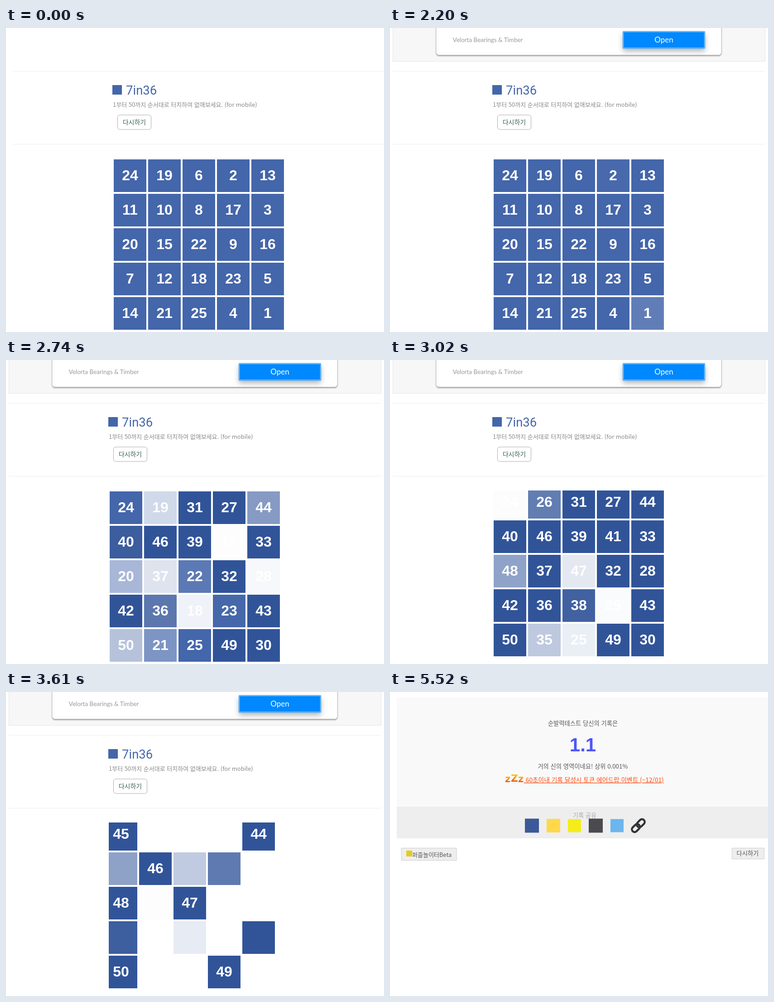
An HTML page that plays this animation: 835x671 px, repeating every 6.28 s.

```html
<!DOCTYPE html>
<html lang="ko">
<head>
<meta charset="utf-8">
<style>
  html, body { margin: 0; width: 100%; height: 100%; overflow: hidden; background: #fff; }
  svg { display: block; width: 100%; height: 100%; font: 300 13.3px "Noto Sans CJK KR", "Noto Sans CJK", sans-serif; }
  .mid { text-anchor: middle; }
  .end { text-anchor: end; }
  .rule { stroke: #eee; }
  .card { fill: #fff; stroke: #ccc; filter: drop-shadow(0 2px 1px rgba(0,0,0,.35)); }
  .open { fill: #08f; filter: drop-shadow(0 6px 6px rgba(0,0,0,.28)); }
  .early { font-family: "Noto Sans", sans-serif; font-weight: 400; }
  .late { font-family: Lato, sans-serif; font-weight: 400; }
  .number { font: bold 32px "Liberation Sans", Arial, sans-serif; fill: #fff; text-anchor: middle; }
  .blurred { filter: blur(10px); }
  .trial { font-family: "Open Sans", sans-serif; font-weight: 400; }
  .heading { font-size: 52px; fill: #333; stroke: #333; stroke-width: 1.2; }
  .plain { fill: #eee; stroke: #ccc; }
  .link { font-size: 13.7px; font-weight: 400; fill: #ff4a10; text-decoration: underline; }
  .chain { fill: none; stroke: #333; stroke-width: 4.5; }
</style>
</head>
<body>
<svg viewBox="0 0 835 671">
  <defs>
    <linearGradient id="sleepy" x2="0" y2="1">
      <stop offset=".25" stop-color="#f5c21c"/><stop offset=".85" stop-color="#ee4a12"/>
    </linearGradient>
  </defs>

  <g id="page">
    <rect x="-60" y="-60" width="970" height="800" fill="#fff"/>
    <g id="ad">
      <rect x="15.5" y="-60" width="822" height="133.5" fill="#f7f7f7" stroke="#e4e4e4"/>
      <rect class="card" x="111" y="-40" width="630" height="99.5" rx="6"/>
      <rect class="open" x="523" y="7" width="182" height="38.5" rx="3"/>
      <rect x="524.5" y="8.5" width="179" height="35.5" rx="2" fill="none" stroke="#fff" stroke-opacity=".75"/>
      <g id="early" class="early">
        <text x="148" y="32" font-size="13" fill="#999">Velorta Bearings &amp; Timber</text>
        <text class="mid" x="614" y="33" font-size="15.5" fill="#fff">Open</text>
      </g>
      <g id="late" class="late">
        <text x="147.5" y="31" font-size="13.5" fill="#999">Velorta Bearings &amp; Timber</text>
        <text class="mid" x="614" y="32" font-size="17" fill="#fff">Open</text>
      </g>
    </g>
    <path class="rule" d="M15 95.5H838M15 256.5H838"/>
    <rect x="235" y="126" width="21" height="21" fill="#4466aa"/>
    <text x="265" y="147" font-size="27.5" fill="#4466aa" style="font-family:Roboto,sans-serif;font-weight:400">7in36</text>
    <text x="236" y="174" font-size="13" fill="#888">1부터 50까지 순서대로 터치하여 없애보세요. (for mobile)</text>
    <rect x="246.5" y="192" width="74" height="32" rx="5" fill="#fff" stroke="#aaa"/>
    <text class="mid" x="283.5" y="213" font-size="14" fill="#3b5f57">다시하기</text>
  </g>

  <clipPath id="frame"><rect id="window" y="288" width="379" height="378"/></clipPath>
  <g clip-path="url(#frame)"><g id="board"></g></g>

  <g id="trial" class="trial">
    <rect width="835" height="377" fill="rgb(71,75,81)" fill-opacity=".663"/>
    <rect y="376.5" width="835" height="295" fill="#fff"/>
    <text class="end heading" x="401" y="484">Start Your Free Trial</text>
    <g font-size="29.15" fill="#666">
      <text x="6" y="545">creative apps and high-end content. Everything you need to make</text>
      <text class="end" x="86" y="583">amazing art.</text>
    </g>
  </g>

  <g id="result">
    <rect width="835" height="671" fill="#fff"/>
    <rect x="15" y="12" width="820" height="241" fill="#f9f9f9"/>
    <rect x="15" y="253" width="820" height="70" fill="#eee"/>
    <g class="mid" fill="#555">
      <text x="426" y="74">순발력테스트 당신의 기록은</text>
      <text x="426" y="131" fill="#4f55f5" style="font:bold 42px 'Liberation Sans',Arial,sans-serif">1.1</text>
      <text x="426" y="169">거의 신의 영역이네요! 상위 0.001%</text>
      <text x="430" y="277" fill="#aaa">기록 공유</text>
    </g>
    <g fill="url(#sleepy)" style="font:bold 21px 'DejaVu Sans',sans-serif">
      <text x="254" y="199">z</text><text x="267" y="198" font-size="22">Z</text><text x="283" y="199">z</text>
    </g>
    <text class="link" x="296" y="199" xml:space="preserve"> 60초이내 기록 달성시 토큰 에어드랍 이벤트 (~12/01)</text>
    <g id="shares"></g>
    <g class="chain" transform="translate(548.5 295) rotate(-45)">
      <rect x="-17.5" y="-6" width="20" height="12" rx="6"/>
      <rect x="-2.5" y="-6" width="20" height="12" rx="6"/>
    </g>
    <rect class="plain" x="25" y="344.5" width="122" height="27"/>
    <rect x="36" y="350" width="13" height="13" fill="#e3cc1c"/>
    <text x="49" y="364" font-size="13" fill="#555">퍼즐놀이터Beta</text>
    <rect class="plain" x="755.5" y="344.5" width="71" height="24"/>
    <text class="mid" x="790" y="361" fill="#555">다시하기</text>
  </g>
</svg>

<script>
const LOOP = 6280, FADE = 170;
const $ = id => document.getElementById(id);
const show = (id, on) => { $(id).style.display = on ? '' : 'none'; };

function add(parent, tag, attributes) {
  const node = document.createElementNS('http://www.w3.org/2000/svg', tag);
  for (const key in attributes) node.setAttribute(key, attributes[key]);
  return parent.appendChild(node);
}

const firstNumbers = [
  24, 19, 6, 2, 13,  11, 10, 8, 17, 3,  20, 15, 22, 9, 16,
  7, 12, 18, 23, 5,  14, 21, 25, 4, 1];
const nextNumbers = [
  45, 26, 31, 27, 44,  40, 46, 39, 41, 33,  48, 37, 47, 32, 28,
  42, 36, 38, 29, 43,  50, 35, 34, 49, 30];

// Number and click time in ms; the clicks between are evenly spaced.
const clickPoints = [[1, 2157], [9, 2377], [25, 2777], [26, 3051], [43, 3500], [50, 3647]];
function clickTime(n) {
  const i = Math.max(1, clickPoints.findIndex(point => point[0] >= n));
  const [n0, t0] = clickPoints[i - 1], [n1, t1] = clickPoints[i];
  return t0 + (t1 - t0) * (n - n0) / (n1 - n0);
}

const tiles = firstNumbers.map((first, i) => {
  const x = 229 + 76 * (i % 5), y = 290 + 76 * Math.floor(i / 5);
  const group = add($('board'), 'g', {});
  return {
    first, next: nextNumbers[i], group,
    box: add(group, 'rect', { x, y, width: 72, height: 72 }),
    label: add(group, 'text', { x: x + 36, y: y + 46, class: 'number' })
  };
});

[[298, 31, '#3b5998'], [346, 30, '#ffd94a'], [393, 29, '#f5ec1c'], [439, 31, '#4a4a4f'], [487, 29, '#6cb5ee']]
  .forEach(([x, size, fill]) => add($('shares'), 'rect', { x, y: 295 - size / 2, width: size, height: size, fill }));

const visible = p => 0.5 + Math.cos(Math.PI * Math.min(1, Math.max(0, p))) / 2;

function drawTile(tile, time) {
  const p = (time - clickTime(tile.first)) / FADE;
  const q = (time - clickTime(tile.next)) / FADE;
  const renewed = p >= 1;
  const opacity = !renewed ? visible(p) : q < 0 ? 1 - visible(p - 1) : visible(q);
  tile.group.setAttribute('opacity', opacity);
  tile.box.setAttribute('fill', renewed ? '#315499' : '#4466aa');
  tile.label.textContent = !renewed ? tile.first : q < 0 ? tile.next : '';
}

function draw(t) {
  const shift = t < 1340 ? 0 : -9;
  const covered = t >= 4520;
  $('page').setAttribute('transform', `translate(${shift})`);
  $('page').setAttribute('class', covered ? 'blurred' : '');
  show('ad', t >= 1320);
  show('early', t < 1480);
  show('late', t >= 1480);
  show('trial', covered && t < 5520);
  show('result', t >= 5520);

  // The game pauses briefly before the second half of the board.
  const gameTime = t < 2900 ? Math.min(t, 2790) : t - 110;
  const dx = t < 1340 ? 9 : t < 3530 ? 0 : -11;
  const dy = t < 2900 ? 0 : -12;
  $('window').setAttribute('x', t < 1340 ? 236 : 227);
  $('board').setAttribute('transform', `translate(${dx} ${dy})`);
  tiles.forEach(tile => drawTile(tile, gameTime));
}

const start = performance.now();
function frame() {
  draw((performance.now() - start) % LOOP);
  requestAnimationFrame(frame);
}
frame();
</script>
</body>
</html>
```
